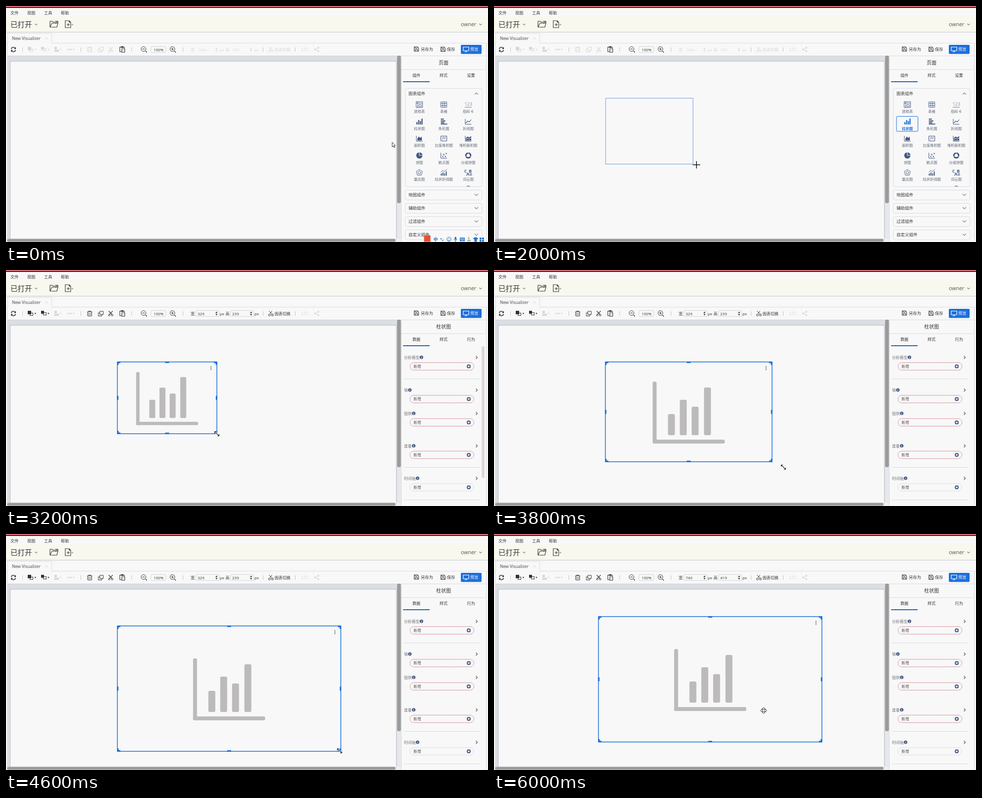
Write an HTML page that moves like this. It is 976 px wide and 480 px high and loops after 6.2 s.

```html
<!DOCTYPE html>
<html lang="zh">
<head>
<meta charset="utf-8">
<style>
html, body { margin: 0; width: 100%; height: 100%; overflow: hidden; background: #f8f8f8; }
svg { display: block; font-family: "Open Sans", "Noto Sans CJK SC", "Noto Sans CJK", sans-serif; }
</style>
</head>
<body>
<svg id="stage" width="976" height="480" viewBox="0 0 976 480"></svg>
<script>
const STEP = 200, STEPS = 31;
const INK = '#333', NAVY = '#44587f', BLUE = '#1c6fdc', LINE = '#d9dce4', PAPER = '#f8f8f8';

// Drawing helpers; each returns SVG markup.
const rect = (x, y, w, h, fill, more = '') => `<rect x="${x}" y="${y}" width="${w}" height="${h}" fill="${fill}" ${more}/>`;
const box = (x, y, w, h, color, more = '') => rect(x, y, w, h, 'none', `stroke="${color}" ${more}`);
const path = (d, color = INK, width = 1, fill = 'none') => `<path d="${d}" stroke="${color}" stroke-width="${width}" fill="${fill}"/>`;
const solid = (d, color = INK) => `<path d="${d}" fill="${color}"/>`;
const dot = (x, y, r, fill) => `<circle cx="${x}" cy="${y}" r="${r}" fill="${fill}"/>`;
const ring = (x, y, r, color, width = 1) => `<circle cx="${x}" cy="${y}" r="${r}" fill="none" stroke="${color}" stroke-width="${width}"/>`;
const text = (x, y, size, str, fill = INK, more = '') => `<text x="${x}" y="${y}" font-size="${size}" fill="${fill}" ${more}>${str}</text>`;
const mid = (x, y, size, str, fill = INK, more = '') => text(x, y, size, str, fill, 'text-anchor="middle" ' + more);
const at = (x, y, inner, more = '') => `<g transform="translate(${x} ${y})" ${more}>${inner}</g>`;
const fade = (on, inner) => `<g opacity="${on ? 1 : .16}">${inner}</g>`;
const down = (x, y, r = 3, color = INK) => path(`M${x - r} ${y - r / 2}L${x} ${y + r / 2}L${x + r} ${y - r / 2}`, color);

// Linear motion through [step, x, y] keys.
function along(keys, s) {
  if (s <= keys[0][0]) return keys[0].slice(1);
  const i = keys.findIndex(k => k[0] >= s);
  if (i < 0) return keys.at(-1).slice(1);
  const [s0, x0, y0] = keys[i - 1], [s1, x1, y1] = keys[i], u = (s - s0) / (s1 - s0);
  return [x0 + (x1 - x0) * u, y0 + (y1 - y0) * u];
}
const pointerKeys = [[0, 782, 277], [2, 837, 240], [3, 837, 240], [6, 233, 188], [7, 226, 187], [10, 410, 323],
  [11, 427, 333], [16, 427, 333], [19, 586, 401], [22, 674, 440], [24, 677, 442], [26, 560, 378], [29, 546, 359]];
const cornerKeys = [[7, 226, 187], [10, 403, 321], [11, 427, 333], [16, 427, 333], [19, 563, 390], [23, 678, 442]];
const shiftKeys = [[26, 0, 0], [29, -14, -19]];

const frame = () =>
  rect(0, 0, 976, 480, PAPER) + rect(0, 1, 976, 3, '#c4000f') + rect(0, 20, 976, 33, '#f8f8ef') +
  rect(0, 52.5, 976, 1.5, '#d5d8da') +
  ['文件', '视图', '工具', '帮助'].map((m, i) => text([9, 43, 77, 111][i], 16.5, 8.2, m)).join('') +
  text(9, 42.5, 14.5, '已打开') + down(61, 37.5, 2.5) +
  at(97, 37, path('M-8 6V-6H-3L-1-4H3M-8 6H6L8-2H-4L-8 6M2-6H8V-1M8-6L3-2', INK, 1.1)) +
  at(126, 37, path('M-6-7H2L5-4V7H-6ZM2-7V-4H5M-3 1H3M0-2V4', INK, 1.1)) + down(134.5, 38, 1.7) +
  text(921, 41, 10.6, 'owner', '#555') + down(961, 37.5, 2.7) +
  path('M0 75.5H3M92 75.5H976M3.5 76V55.5H92.5V76M2.5 76V480', LINE) +
  text(12, 69, 8.55, 'New Visualizer', '#444') + path('M80 64L84 68M84 64L80 68', '#ccc', .8) +
  rect(2, 101, 798, 379, '#dbdee3') + rect(9, 113, 781, 361, PAPER) +
  path('M8.5 474V112.5H790.5V474', '#b9bcc5') + path('M3 101.5H800', '#cfd2d8') +
  rect(792, 401, 8, 73, '#e6e8ec') + rect(792, 101, 7.5, 300, '#9d9a9a', 'rx="3"') +
  rect(2, 473, 798, 7, '#eceef0') + rect(2, 473.5, 787, 6, '#9d9a9a', 'rx="3"') +
  rect(800, 101, 172, 379, PAPER) + path('M800.5 101V480M972.5 76V480M800 101.5H972M800 129.5H972', LINE);

function field(x, value, on) {
  return (on ? box(x + .5, 82.5, 47, 12, '#d3d6dd', 'rx="1.5"') : '') + text(x + 4, 91.5, 8, value) +
    solid(`M${x + 40} 87.5l2.2-3l2.2 3zM${x + 40} 89.5l2.2 3l2.2-3z`) + text(x + 49, 91.5, 8, 'px');
}

function toolbar(on, w, h) {
  const disk = path('M-4-4.5H2.5L4.5-2.5V4.5H-4.5V-4.5ZM-2.5-4.5V-1.5H2V-4.5M-2.5 4.5V1H2.5V4.5', INK);
  const lens = path('M3 3L6 6', INK, 1.2) + ring(-1, -1, 4.8, INK) + path('M-3.5-1H1.5', INK);
  const caret = x => solid(`M${x - 2} 87.5h4l-2 2.5z`);
  return at(15, 88.5, path('M-4.5-1A4.7 4.7 0 0 1 4-2.5M4.5 1A4.7 4.7 0 0 1-4 2.5', INK, 1.4) + solid('M5-5V-1H1ZM-5 5V1H-1Z')) +
    path([33, 151, 254, 358, 520, 585].map(x => `M${x + .5} 84V93`).join(''), '#c6c6c6') +
    fade(on, rect(44, 83, 7, 7, INK) + box(48.5, 87.5, 6, 5, INK) + caret(59.5) +
      box(75.5, 86.5, 6, 5, INK) + rect(71, 83, 6, 6, INK) + caret(86) +
      at(169.5, 88.5, path('M-5-3.5H5M-2-3.5V-5H2V-3.5M-4-3.5V5H4V-3.5M-1.5-1V3M1.5-1V3')) +
      at(192, 88.5, path('M-2-4.5H5V2H-2ZM-2-1.5H-5V5H2V2')) +
      at(212, 88.5, path('M-4-5L2.5 2M4-5L-2.5 2', INK, 1.2) + ring(-3, 3.3, 1.7, INK) + ring(3, 3.3, 1.7, INK))) +
    fade(false, rect(98, 83, 5, 5, INK) + rect(98, 89, 9, 4, INK) + caret(111) + path('M124 88.5H134', INK, 2) + caret(137)) +
    at(235.5, 88, path('M-1.5 5H-5V-4.5H4V-2M-2-5.5H1.5V-3.5H-2ZM-1-1H5V6H-1Z', INK, 1.1)) +
    at(279.5, 88.5, lens) + at(338, 88.5, lens + path('M-1-3.5V1.5')) +
    box(293.5, 82.5, 30, 12, '#d3d6dd', 'rx="1.5"') + mid(309, 91.5, 7.9, '100%') +
    fade(on, text(374, 91.8, 8, '宽') + field(384, w, on) + text(444.5, 91.8, 8, '高') + field(454, h, on) +
      at(536.5, 88.5, path('M-4-5L3 2M2-5L-2 0') + ring(-3, 3, 2, INK) + ring(3, 3, 2, INK)) + text(544, 91.5, 8, '图表切换')) +
    fade(false, path('M601 85L598 88.5L601 92M608 85L611 88.5L608 92M606 84L603 93M626 88.5L632 85M626 88.5L632 92') +
      dot(626, 88.5, 1.8, INK) + dot(632.5, 85, 1.8, INK) + dot(632.5, 92, 1.8, INK)) +
    at(831, 87.5, disk) + text(840, 91, 8.2, '另存为') + at(885, 88, disk) + text(893, 91, 8.2, '保存') +
    rect(921, 79, 42, 18.5, BLUE, 'rx="2"') +
    at(931.5, 88, path('M-5.5-4.5H5.5V3H-5.5ZM-2.5 5H2.5M0 3V5', '#fff', 1.2)) + text(940, 91.2, 8.2, '预览', '#fff');
}

const bars = (list, color) => list.map(([x, y, w, h]) => rect(x, y, w, h, color)).join('');
const axes = c => path('M-6-5.5V5.5H6.5', c);
// Chart palette: label and icon painter.
const palette = [
  ['透视表', c => path('M-6.5-6H6.5V6H-6.5ZM-3.5-6V6M-6.5-3H6.5M-1 4V0H4V4Z', c, .9)],
  ['表格', c => path('M-6-5.5H6V5.5H-6ZM-6-2H6M-6 2H6M-2-5.5V5.5M2-5.5V5.5', c, .9)],
  ['指标卡', c => mid(0, 2.5, 9.2, '123', c, 'font-weight="300"') + path('M-7 5.5H7', c, .8)],
  ['柱状图', c => bars([[-6, 1, 2.3, 5], [-2.5, -3, 2.3, 9], [1, -1, 2.3, 7], [4.3, -6, 2.3, 12]], c)],
  ['条形图', c => bars([[-6, -6, 6, 2.2], [-6, -2.3, 9, 2.4], [-6, 1.3, 7, 2.2], [-6, 4.2, 13, 1.8]], c)],
  ['折线图', c => axes(c) + path('M-5 3L-1-1L2 1L6-4', c, 1.2)],
  ['面积图', c => axes(c) + solid('M-4 4V0L-1-4L2-1L5-4V4Z', c)],
  ['比值堆积图', c => path('M-6-5H6V5H-6Z', c) + path('M-4 3L-1-1L1 1L4-2M-4-1L-1-3L2-1L4-3', c, .8)],
  ['堆积面积图', c => axes(c) + solid('M-5 4V2L-1 0L2 2L6-1V4Z', c) + solid('M-5 1V-1L-1-4L2-2L6-5V-2L2 1L-1-1Z', c)],
  ['饼图', c => dot(0, 0, 6.3, c) + path('M0-7V0H7', PAPER, 1.1)],
  ['散点图', c => axes(c) + dot(-2, 2, 1.2, c) + dot(0, -2, 1.3, c) + dot(3, 2, 1.2, c) + dot(5, -4, 1.2, c)],
  ['分组饼图', c => ring(0, 0, 4.8, c, 3) + path('M0-7V-3M6 3L3 1.5M-6 3L-3 1.5', PAPER, .9)],
  ['雷达图', c => path('M0-6.3L6.3-1.7L4 5.7H-4L-6.3-1.7ZM0-3L3-.7L2 3H-2L-3-.7Z', c, .9)],
  ['柱状折线图', c => bars([[-6, 2, 2, 4.5], [-2.7, 0, 2, 6.5], [.6, 2, 2, 4.5], [4, -2, 2, 8.5]], c) + path('M-6-1L-2-4L1-2L6-6', c)],
  ['词云图', c => [['C', -8, 0, 8], ['B', 1, 0, 9], ['A', -4, 6.5, 9.5], ['D', 3, 6, 6.5]]
    .map(([l, x, y, s]) => text(x, y, s, l, c, 'font-weight="700"')).join('')]
];

const header = (title, tabs) => mid(886, 118.7, 10, title) +
  tabs.map((t, i) => mid([831, 886, 941.5][i], 144, 8.1, t)).join('') + rect(804, 153, 54, 2, '#2865bd');

function palettePanel(s) {
  const picked = s >= 3;
  const cells = palette.map(([name, icon], i) => {
    const x = [837, 886.5, 936][i % 3], y = 200.5 + Math.floor(i / 3) * 34.5, hot = picked && i === 3;
    return (hot ? box(815, 224.5, 43.5, 30.5, BLUE, 'rx="2"') : '') + at(x, y, icon(hot ? BLUE : NAVY)) +
      mid(x, y + 16.5, 7.35, name, hot ? BLUE : '#5f6675', hot ? 'font-weight="700"' : '');
  }).join('');
  return header('页面', ['组件', '样式', '设置']) + box(808.5, 167.5, 155.5, 200, LINE, 'rx="3"') +
    text(815, 181, 8.5, '图表组件') + path('M949 180L952.5 176.5L956 180', INK) + cells +
    path('M933 367Q936 365 939 367', NAVY, 1.2) +
    (s > 1 && s < 8 ? rect(958, 188, 6, 129, '#b5abab', 'rx="3"') : '') +
    ['地图组件', '辅助组件', '过滤组件', '自定义组件'].map((name, i) => {
      const y = 374 + i * 27;
      return box(808.5, y + .5, 155.5, 20, LINE, 'rx="3"') + text(815, y + 13, 8.5, name) + down(952.5, y + 10, 3.5);
    }).join('');
}

function dataPanel(s) {
  const rows = [['分析模型', 177.5], ['轴', 244], ['图例', 291.5], ['度量', 357.5], ['时间轴', 423.5]];
  return header('柱状图', ['数据', '样式', '行为']) + path('M806 221.5H960M806 401.5H960M806 467.5H960', LINE) +
    rows.map(([name, y], i) => {
      const ix = 806 + name.length * 7.8 + 4, py = y + 18.5;
      return text(806, y + 3, 7.8, name, '#777') + dot(ix, y, 3.5, NAVY) + rect(ix - .5, y - 2.3, 1, 1, '#fff') +
        rect(ix - .5, y - .7, 1, 3, '#fff') + path(`M951.5 ${y - 2.8}l3 3l-3 3`, '#666', 1.4) +
        box(818, py - 7.7, 129.5, 15.4, i < 4 ? '#c4667a' : '#cdd0dc', 'rx="7.7" stroke-dasharray="2 1"') +
        text(825, py + 2.8, 7.8, '新增', '#555') + dot(937, py, 4, NAVY) + path(`M934.8 ${py}h4.4M937 ${py - 2.2}v4.4`, '#fff', 1.3);
    }).join('') + (s < 18 ? rect(963, 155, 6, 268, '#e0d5d9', 'rx="3"') : '');
}

function widget(x, y, w, h) {
  const r = x + w, b = y + h, cx = x + w / 2, cy = y + h / 2, k = Math.min(1, h / 170);
  const blocks = [[-73, -63, 8, 126], [-73, 55, 146, 8], [-42, 3, 14, 43], [-18, -26, 14, 72], [6, -12, 14, 58], [31, -51, 14, 97]];
  const corner = (px, py, dx, dy) => `M${px + dx * 6} ${py + dy}H${px + dx}V${py + dy * 6}`;
  return at(cx, cy + 1.5, blocks.map(a => rect(...a, '#bcbaba', 'rx="3"')).join('').replace(/^/, `<g transform="scale(${k})">`) + '</g>') +
    box(x, y, w, h, BLUE, 'stroke-width="1.5"') +
    path(corner(x, y, 1, 1) + corner(r, y, -1, 1) + corner(x, b, 1, -1) + corner(r, b, -1, -1) +
      `M${cx - 4} ${y + .7}h8M${cx - 4} ${b - .7}h8M${x + .7} ${cy - 4}v8M${r - .7} ${cy - 4}v8`, BLUE, 3) +
    [9.5, 12.5, 15.5].map(d => dot(r - 12, y + d, 1, '#555')).join('');
}

const outlined = (d, w = 1.1) => path(d, '#fff', w + 2) + path(d, '#222', w);
const pointers = {
  arrow: path('M0 0V9.5L2.2 7.6L3.8 11L5.2 10.3L3.7 7H6.5Z', '#222', .9, '#fff'),
  cross: path('M-7.5 0H7.5M0-7.5V7.5', '#111', 1.5),
  resize: outlined('M-4.5-1V-4.5H-1M4.5 1V4.5H1M-4.5-4.5L4.5 4.5'),
  move: path('M-6.5 0L-3.5-3V-1.2H-1.2V-3.5H-3L0-6.5L3-3.5H1.2V-1.2H3.5V-3L6.5 0L3.5 3V1.2H1.2V3.5H3L0 6.5L-3 3.5H-1.2V1.2H-3.5V3Z', '#222', .9, '#fff')
};

function inputBar() {
  const c = '#2472c8';
  return rect(846, 468, 125, 12, PAPER) + rect(846.5, 466.5, 13, 13, '#e8502c') +
    mid(870, 478, 9, '中', c, 'font-weight="700"') + dot(881, 473.5, 1.3, c) + path('M885 475L884 478', c, 1.5) +
    ring(897, 474.5, 4.3, c) + path('M894.5 475.5Q897 479 899.5 475.5M895.5 472.5V474M898.5 472.5V474', c) +
    rect(908.5, 469.5, 3.5, 6, c, 'rx="1.7"') + path('M907 474Q910 480 913.5 474M910.2 477V480', c) +
    rect(919, 471, 10, 7.5, c, 'rx="1"') + path('M920 473H928M920 475H928M922 477H926', '#fff', .8) +
    dot(937, 472, 2, '#b5bac2') + rect(933.5, 475, 8, 4, '#b5bac2', 'rx="2"') +
    solid('M946 473L949 470.5H953L956 473L954.5 475L953.5 474V479.5H948.5V474L947.5 475Z', c) +
    bars([[959, 471, 3.8, 3.8], [964, 471, 3.8, 3.8], [959, 475.7, 3.8, 3.8], [964, 475.7, 3.8, 3.8]], c);
}

function scene(s) {
  const made = s >= 12, done = s >= 25;
  const [px, py] = along(pointerKeys, s), [cx, cy] = along(cornerKeys, s), [dx, dy] = along(shiftKeys, s);
  const size = done ? [740, 419] : made ? [329, 239] : [1280, 720];
  let out = frame() + toolbar(made, ...size) + (made ? dataPanel(s) : palettePanel(s));
  if (made) out += widget(225.5 + dx, 187 + dy, cx - 225.5, cy - 187);
  else if (s > 7) out += box(226, 187.5, cx - 226, cy - 187, '#6f9bd6');
  if (s === 0) out += inputBar();
  return out + at(px, py, pointers[s < 4 ? 'arrow' : !made ? 'cross' : done ? 'move' : 'resize']);
}

const stage = document.getElementById('stage'), start = performance.now();
let shown = -1;
function tick() {
  const s = Math.floor((performance.now() - start) / STEP) % STEPS;
  if (s !== shown) stage.innerHTML = scene(shown = s);
  requestAnimationFrame(tick);
}
tick();
</script>
</body>
</html>
```
